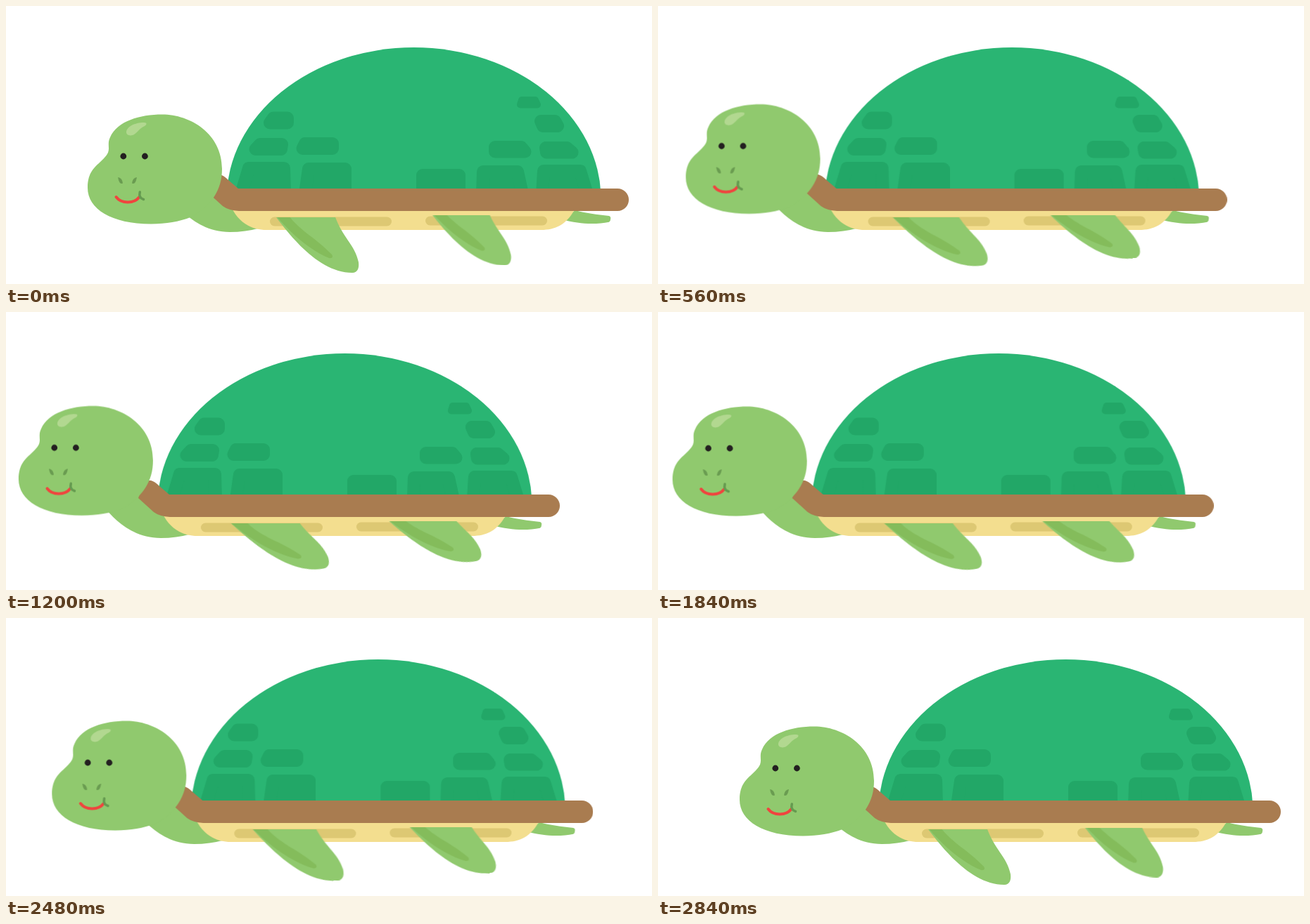
Animation of 918 by 396 pixels, one loop 2960 ms. Source, as an HTML page without scripts:

```html
<!DOCTYPE html>
<html lang="en">
<head>
<meta charset="utf-8">
<title>Turtle</title>
<style>
  html, body { margin: 0; width: 100%; height: 100%; overflow: hidden; background: #fff; }
  svg { display: block; width: 100%; height: 100%; }

  .turtle, .head, .leg { animation: 2960ms linear infinite; }
  .turtle { animation-name: glide; }
  .head { animation-name: lift; }
  .leg { animation-name: paddle; transform-origin: 450px 95px; }

  /* out for 1420 ms, back as a mirror image, then a short rest */
  @keyframes glide {
    0% { transform: none; animation-timing-function: cubic-bezier(.33, 0, 0, 1); }
    47.973% { transform: translateX(-99px); animation-timing-function: cubic-bezier(1, 0, .67, 1); }
    95.946%, 100% { transform: none; }
  }
  @keyframes lift {
    0% { transform: none; animation-timing-function: cubic-bezier(.33, 0, .13, 1); }
    47.973% { transform: translateY(-20.9px); animation-timing-function: cubic-bezier(.87, 0, .67, 1); }
    95.946%, 100% { transform: none; }
  }
  @keyframes paddle {
    0% { transform: rotate(0deg); animation-timing-function: cubic-bezier(.33, 0, 0, 1); }
    47.973% { transform: rotate(-12deg); animation-timing-function: cubic-bezier(1, 0, .67, 1); }
    95.946%, 100% { transform: rotate(0deg); }
  }

  .skin { fill: #90c96e; }
  .shade { fill: #84bc5b; }
  .shell { fill: #2ab573; }
  .tiles { fill: #22a767; stroke: #22a767; stroke-width: 18; stroke-linejoin: round; }
  .small { stroke-width: 10; }
  .rim { fill: #a97c50; }
  .belly { fill: #f3de8f; }
  .band { fill: #ddc873; }
  .nose { fill: #6a9c51; }
  .line { fill: none; stroke-linecap: round; }
</style>
</head>
<body>
<svg viewBox="0 0 918 396">
  <defs>
    <clipPath id="below"><rect x="300" y="301" width="400" height="95"/></clipPath>
    <clipPath id="belowRear"><rect x="520" y="298.5" width="400" height="98"/></clipPath>
    <clipPath id="dome"><rect x="300" y="40" width="570" height="225"/></clipPath>
    <g id="leg">
      <path class="skin" d="M369 280C391 311 438 380 492 380C500 380 502 373 501 365C496 340 478 330 467 298L460 275Z"/>
      <path class="shade" d="M371 283C393 312 425 345 459 359C464 360 465 357 463 354C440 330 420 322 402 299L392 283Z"/>
    </g>
  </defs>

  <g class="turtle">
    <path class="skin" d="M809 291C823 295 840 297 857 299Q860 300 859 304Q859 307 857 307.7C838 311.5 815 311 790 304Z"/>
    <path class="skin" d="M236 276C252 296 278 322 318 322Q340 322 362 316L320 285L285 245Z"/>

    <path class="belly" d="M322 290C330 305 345 319 370 319H760C785 319 798 308 808 290Z"/>
    <rect class="band" x="375" y="300.5" width="173" height="13" rx="6.5"/>
    <rect class="band" x="596" y="299.5" width="173" height="13" rx="6.5"/>

    <g clip-path="url(#below)">
      <g class="leg"><use href="#leg"/></g>
    </g>
    <g clip-path="url(#belowRear)">
      <g transform="translate(216.5 -10.5)">
        <g class="leg"><use href="#leg"/></g>
      </g>
    </g>

    <g clip-path="url(#dome)">
      <ellipse class="shell" cx="579.5" cy="275" rx="266" ry="216"/>
      <path class="tiles small" d="M733 134H752L755 140.5H731Z"/>
      <path class="tiles" d="
        M380 159.5H400V166.5H375Z
        M361 197H392L391 204H354.5Z
        M425 196H464V203H421.5Z
        M345 231H395L396 268H334Z
        M430 232H482V268H425Z
        M760 164H780L784 171H763Z
        M695 201H732L737.5 207.5H695Z
        M767 202H797L804.5 208.5H768Z
        M592 241H644V268H592Z
        M678 236H727L734 268H677Z
        M764 235H816L826 268H762Z"/>
    </g>
    <path class="rim" d="M295 240H304Q309 241 316 248L330 260H869A16 16 0 0 1 869 292H331Q316 291 308 285L286 265Z"/>

    <g class="head">
      <path class="skin" d="M222 154.5C262 154.5 307 182 307 232C307 262 292 285 262 301C246 307 228 310.5 206 310.5C150 310.5 116 289 116 259C116 240 123 232 133 223C141 215 146 211 146 203C146 197 145 193 148 187C158 164 190 154.5 222 154.5Z"/>
      <path fill="#b2d890" d="M171 180C171 172 183 166 196 166C201 166 200 169 197 171C190 174 187 180 182 183C177 186 171 184 171 180Z"/>
      <g fill="#231f20">
        <circle cx="166.8" cy="214" r="4.4"/>
        <circle cx="197.4" cy="214" r="4.4"/>
      </g>
      <path class="nose" d="M159 244Q165 244.5 166 252.5Q161 255 159 244Z"/>
      <path class="nose" d="M186 244Q180 244.5 179 252.5Q184 255 186 244Z"/>
      <path class="line" stroke="#f0443e" stroke-width="4" d="M156.5 272Q162 279.5 173 279.5Q184 279.5 189.5 272"/>
      <path class="line" stroke="#659a50" stroke-width="3.5" d="M190.3 265C189 270 190.5 274 195.5 275.5"/>
    </g>
  </g>
</svg>
</body>
</html>
```
